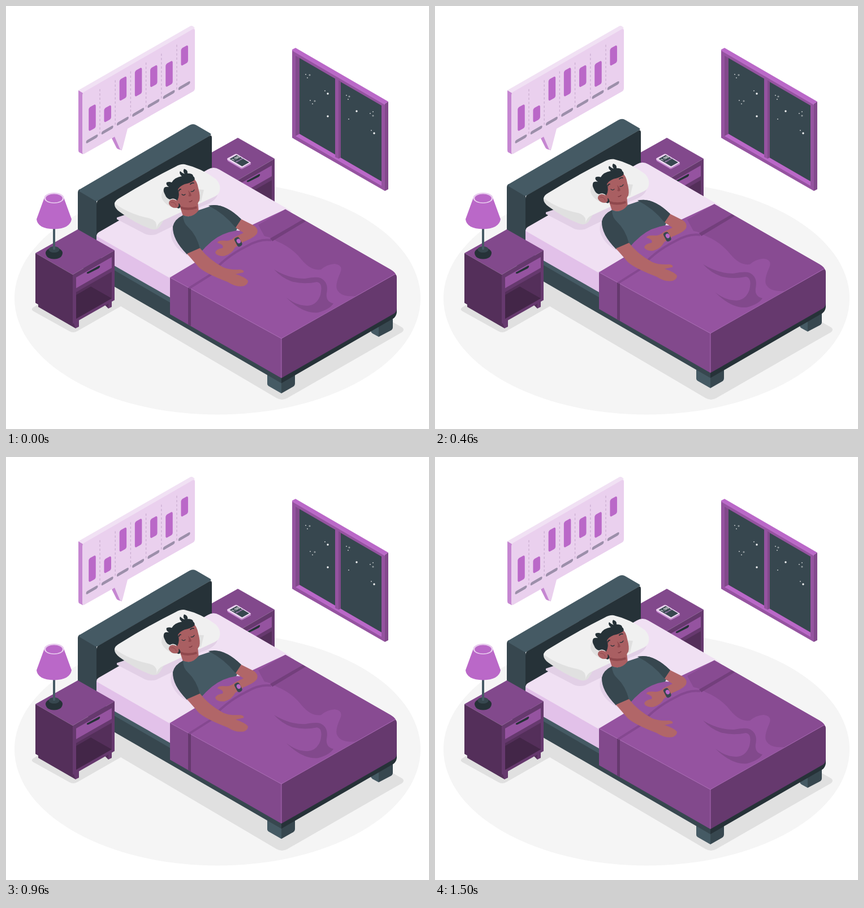
An HTML page for the animation above (1540 ms loop, 748 px wide and 748 px high).

```html
<!DOCTYPE html>
<html lang="en">
<head>
<meta charset="utf-8">
<title>Sleep tracking</title>
<style>
html, body { margin: 0; width: 100%; height: 100%; overflow: hidden; background: #fff; }
svg { display: block; width: 100vw; height: 100vh; }
.p1 { fill: #ba68c8; } .p2 { fill: #9553a0; } .p3 { fill: #82498c; }
.p4 { fill: #66396e; } .p5 { fill: #542f5a; } .p6 { fill: #432648; }
.d1 { fill: #455a64; } .d2 { fill: #37474f; } .d3 { fill: #263238; }
.skin { fill: #b16668; } .face { fill: #a95f62; } .shade { fill: #8f484d; }
.line { fill: none; stroke-linecap: round; stroke-linejoin: round; }
text { font-family: Roboto, sans-serif; font-weight: 700; }
</style>
</head>
<body>
<svg viewBox="0 0 748 748">
<defs>
  <g id="stand">
    <path class="p5" d="M57 522V532L123 570V556Z"/>
    <path class="p4" d="M123 570L129 567V552L118 556Z"/>
    <path class="p5" d="M174 528L181 535V522Z"/>
    <path class="p4" d="M181 535L187 532V518L181 522Z"/>
    <path class="p3" d="M52 437L127 395L192 432L118 475Z"/>
    <path class="p5" d="M52 437L118 475V562L52 525Z"/>
    <path class="p4" d="M118 475L192 432V520L118 562Z"/>
    <path class="p2" d="M124 480L187 444V463L124 499Z"/>
    <path class="d3" d="M143 471L165 459Q168 460 164 464L146 473Q142 474 143 471Z"/>
    <path class="p5" d="M124 506L187 470V517L124 553Z"/>
    <path class="p6" d="M124 553L187 517L150 496L124 511Z"/>
  </g>
</defs>

<ellipse cx="374" cy="517" rx="359" ry="205.500" fill="#f5f5f5"/>
<path fill="#e0e0e0" d="M48 533Q43 537 49 540L112 575Q119 579 126 575L203 531L478 693Q488 699 498 693L700 577Q706 572 700 568L650 540L300 420L120 490Z"/>

<g id="window">
  <path class="p1" d="M506 77L512 74L676 169L670 173Z"/>
  <path class="p3" d="M670 173L676 169V324L670 327Z"/>
  <path class="p2" d="M506 77L670 173V327L506 233Z"/>
  <path class="p3" d="M512 88L519 92V227L512 230Z"/>
  <path class="p1" d="M512 230L519 226L664 310V318Z"/>
  <path class="d2" d="M519 92L664 176V310L519 226Z"/>
  <path class="p2" d="M582 128L588 131V270L582 267Z"/>
  <path class="p3" d="M588 131L592 134V268L588 270Z"/>
  <path class="p1" d="M506 77L670 173V175L506 79Z"/>
  <g id="stars" fill="#fff"></g>
</g>

<g id="chart">
  <path fill="#c586d1" d="M128 149L136 153V262L130 259Q128 258 128 255Z"/>
  <path fill="#f1e1f4" d="M128 149L325 36Q328 34 331 36L334 39L136 154Z"/>
  <path fill="#c586d1" d="M187 234L195 229L205 255L198 253Q196 252 195 250Z"/>
  <path fill="#ead0ee" d="M135 158Q135 154 138 152L330 41Q334 39 334 43V145Q334 149 331 151L215 217L206 252Q204 257 201 252L192 231L139 261Q135 263 135 259Z"/>
</g>

<use href="#stand" x="283" y="-162"/>
<g id="phone">
  <path fill="#c586d1" d="M391 271L417 287L433 278V280L418 288Q416 289 414 287L392 274Z"/>
  <path fill="#ecd3f0" d="M392 269L405 262Q407 261 409 262L432 276Q434 277 432 278L419 285.500Q417 287 415 285.500L392 272Q390 270.500 392 269Z"/>
  <path class="d2" d="M395.500 270.500L408 263.500L430 276.500L417.500 283.500Z"/>
  <g transform="matrix(.87 -.48 .85 .5 402 273)">
    <text font-size="7" fill="#fff" x="-1" y="1">1:00</text>
    <text font-size="4.200" fill="#ce93d8" x="0" y="7">Monday</text>
  </g>
</g>

<g id="bed">
  <path class="d1" d="M645 555L659 555V585L648 579Q645 577 645 574Z"/>
  <path class="d2" d="M659 555L684 545V568Q684 572 680 574L659 585Z"/>
  <path class="d1" d="M462 645L487 657V685L466 673Q462 671 462 668Z"/>
  <path class="d2" d="M487 657L511 645V667Q511 671 508 673L487 685Z"/>

  <path class="d2" d="M127 330Q127 326 130 324L160 342V478L127 458Z"/>
  <path class="d1" d="M129 325L324 211Q331 207 337 211L361 225Q364 227 361 229L163 344Q160 346 157 344L130 328Z"/>
  <path class="d3" d="M160 350Q160 345 164 343L359 230Q364 227 364 233V330L160 440Z"/>

  <path class="d2" d="M160 445L487 636V667L160 478Z"/>
  <path class="d1" d="M160 438L300 518V530L160 449Z"/>
  <path class="d3" d="M487 640L691 523V542Q690 549 685 552.500L487 667Z"/>

  <path fill="#e2c1e9" d="M160 405L300 482V521L165 444Q160 441 160 435Z"/>
  <path fill="#f0e0f3" d="M164 400L357 289Q367 283 377 289L505 363L300 487L162 408Q158 404 164 400Z"/>
  <path fill="#e2d0e6" d="M196 374L300 340L374 334Q370 347 344 355L298 388L265 404Q252 407 242 401L196 377Z"/>
  <path fill="#e3d1e8" d="M298 383Q286 401 296 418Q306 437 334 447L350 432L320 385Z"/>

  <path fill="#e0e0e0" d="M192 349Q191 357 201 364Q228 384 255 394Q266 398 272 390L290 360L230 335Z"/>
  <path fill="#f0f0f0" d="M192 349Q193 344 200 340Q250 309 300 284Q309 279 316 280Q346 287 371 306Q380 315 378 326Q377 333 369 337L274 381Q269 384 266 393Q269 379 252 375Q218 368 192 349Z"/>
  <path fill="#e0e0e0" d="M284 320Q274 327 275 338Q279 351 298 358L345 345L350 325Z"/>

  <path class="p2" d="M290 480L352 443Q370 406 412 398L494 359.500L680 466Q691 473 691 482L487 588Z"/>
  <path class="p3" d="M290 480L487 588V658L290 545Z"/>
  <path class="p4" d="M487 588L685 475Q691 472 691 481V534Q691 541 686 544L487 658Z"/>
  <path fill="#884b92" d="M446 387L494 359.500L680 466Q687 470 689 474L619 513Q594 515 587 504Q580 496 591 472Q597 458 581 456Q567 457 557 466Q540 469 523 449Q506 427 479 416Q466 408 457 407Z"/>
  <path class="line" stroke="#a869b3" stroke-width="1" d="M290 480L487 588L688 474M487 588V657"/>
  <path class="p4" d="M322 498L327 500V566L322 563Z"/>
  <path class="line" stroke="#854890" stroke-width="4" style="stroke-linecap: butt" d="M324 499L362 475Q385 445 425 425Q449 411 469 414"/>
  <path fill="#733f7c" d="M467 411L525 377.500L530 380.500L471 416Z"/>
  <path class="p3" d="M474 466Q502 483 529 482Q549 478 556 481Q571 488 567 508Q565 523 579 526Q573 536 552 542Q525 545 495 515Q513 530 533 530Q550 529 556 511Q561 490 550 488Q526 493 505 487Q488 481 474 466Z"/>

  <path class="face" d="M304 344L339 345L341 365Q330 375 313 371Z"/>
  <path class="shade" d="M308 354Q323 359 337 354L338 358Q322 363 310 359Z"/>
  <path class="d1" d="M313 370Q329 377 341 361L368 352Q387 351 416 377L406 400L355 438L341 430L320 439Q296 411 296 391Q299 378 313 370Z"/>
  <path class="d2" d="M313 370Q298 377 295 390Q294 413 320 439L343 429Q337 405 322 391Q313 383 313 370Z"/>
  <path class="d2" d="M358 353Q386 347 416 377L406 392Q386 367 358 353Z"/>
  <path class="p2" d="M343 437Q353 425 364 416Q382 401 408 397L446 400L420 425L365 445Z"/>

  <path class="skin" d="M320 438L343 428Q358 448 384 462Q394 467 414 466Q422 467 420 471L406 474Q424 480 428 486Q428 492 421 495Q407 498 392 488Q353 473 341 462Z"/>
  <path class="skin" d="M406 392L416 377L438 388Q447 394 444 402Q440 409 420 417L405 427Q400 438 386 442Q373 443 370 436Q371 430 383 428Q386 422 374 419Q374 414 388 415Q397 416 404 409L420 401Z"/>
  <g transform="rotate(-28 411 417)">
    <rect class="d2" x="406" y="408.500" width="9.500" height="17" rx="4"/>
    <ellipse class="p1" cx="412" cy="416" rx="3.500" ry="4.200"/>
  </g>

  <path class="face" d="M299 322L330 303Q338 309 340 322Q344 336 342 344Q338 353 326 355Q312 356 302 350Z"/>
  <path class="d3" d="M303 344Q296 338 290 342Q284 341 281 333Q277 326 280 321Q283 319 288 320Q282 316 284 312Q289 310 293 312Q298 303 311 301Q305 296 308 292Q312 296 316 297Q312 292 315 288Q322 290 321 296Q331 296 331 301Q335 304 333 308Q327 313 316 315Q308 318 304 324Q308 334 303 344Z"/>
  <path class="d3" d="M299 352L306 349Q311 355 306 358Q299 357 299 352Z"/>
  <path class="face" d="M305 349Q302 342 294 342Q287 344 288 350Q292 358 302 357Q307 355 305 349Z"/>
  <path class="line" stroke="#8f484d" stroke-width="1" d="M292 347Q299 346 301 353"/>
  <path class="line" stroke="#263238" stroke-width="1.800" d="M306 327Q306 324 309 324M326 315Q329 312 332 313"/>
  <path class="line" stroke="#263238" stroke-width="1.200" d="M311 333Q314 336 317 333M327 328Q331 329 333 325"/>
  <path class="shade" d="M322 326Q326 329 328 335Q326 338 322 336Q325 334 322 326Z"/>
  <path class="line" stroke="#7a383f" stroke-width="1.300" d="M324 346Q326 347 329 344"/>
</g>

<use href="#stand"/>
<g id="lamp">
  <path class="d3" d="M70 437Q70 432 76 429H94Q100 432 100 437Q99 447 85 447.500Q71 447 70 437Z"/>
  <ellipse class="d2" cx="85" cy="430.500" rx="9.500" ry="5.500"/>
  <rect class="d1" x="83" y="388" width="4" height="43" rx="1.500"/>
  <path class="p1" d="M67.500 340L54 377Q56 394 85 394.500Q113 394 116 377L102.500 340Z"/>
  <ellipse cx="85" cy="339.500" rx="17.500" ry="9.500" fill="#e8cdee"/>
  <ellipse class="p1" cx="85" cy="340" rx="14.800" ry="7.500"/>
</g>
</svg>

<script>
const $ = id => document.getElementById(id);

function add(parent, tag, attrs) {
  const el = document.createElementNS('http://www.w3.org/2000/svg', tag);
  for (const key in attrs) el.setAttribute(key, attrs[key]);
  parent.append(el);
}

// Rounded box centred on x, y and sheared onto the panel.
function slab(x, y, w, h, rx, fill) {
  add($('chart'), 'rect', {
    x: -w / 2, y: -h / 2, width: w, height: h, rx, fill,
    transform: `translate(${x} ${y}) skewY(-30)`
  });
}

// Centre and height of each bar.
const bars = [[197.5, 42], [190.5, 25], [146, 38], [134.5, 46], [124, 34], [120, 41], [87.5, 31]];
bars.forEach(([y, h], i) => {
  const x = 152.5 + 27.2 * i;
  slab(x, y, 12.5, h, 3.5, '#ba68c8');
  slab(x - .5, 235 - 15.7 * i, 21, 5.5, 2.7, '#9c8faa');
  if (i < 6) add($('chart'), 'line', {
    x1: x + 13.5, x2: x + 13.5, y1: 147 - 15.7 * i, y2: 227 - 15.7 * i,
    stroke: '#cbaed2', 'stroke-width': 1.3, 'stroke-dasharray': '4 3.5'
  });
});

const bright = [[569, 155], [569, 195], [620, 186], [651, 225]];
const faint = [[537, 122], [546, 168], [607, 160], [649, 194]];
const small = [[564, 150], [530, 121], [533, 127], [538, 167], [542, 173], [602, 158],
  [605, 165], [606, 200], [644, 190], [649, 187], [646, 220]];
function dots(list, r, opacity) {
  for (const [cx, cy] of list) add($('stars'), 'circle', { cx, cy, r, opacity });
}
dots(bright, 1.7, .95);
dots(faint, 1.6, .45);
dots(small, .9, .75);

// The bed floats up and down at constant speed, in 37 steps per loop.
const LOOP = 1540, STEPS = 37, RISE = 15, PERIOD = 1500, LEAD = 25;
function lift(ms) {
  const phase = ((ms + LEAD) / PERIOD) % 1;
  return RISE * (1 - Math.abs(2 * phase - 1));
}
const start = performance.now();
function draw(now) {
  const t = Math.max(0, now - start) % LOOP;
  const step = Math.floor(t / LOOP * STEPS + .07) % STEPS;
  const y = lift(0) - lift(step * 1000 / 24);
  $('bed').setAttribute('transform', `translate(0 ${y.toFixed(2)})`);
  requestAnimationFrame(draw);
}
draw(start);
</script>
</body>
</html>
```
